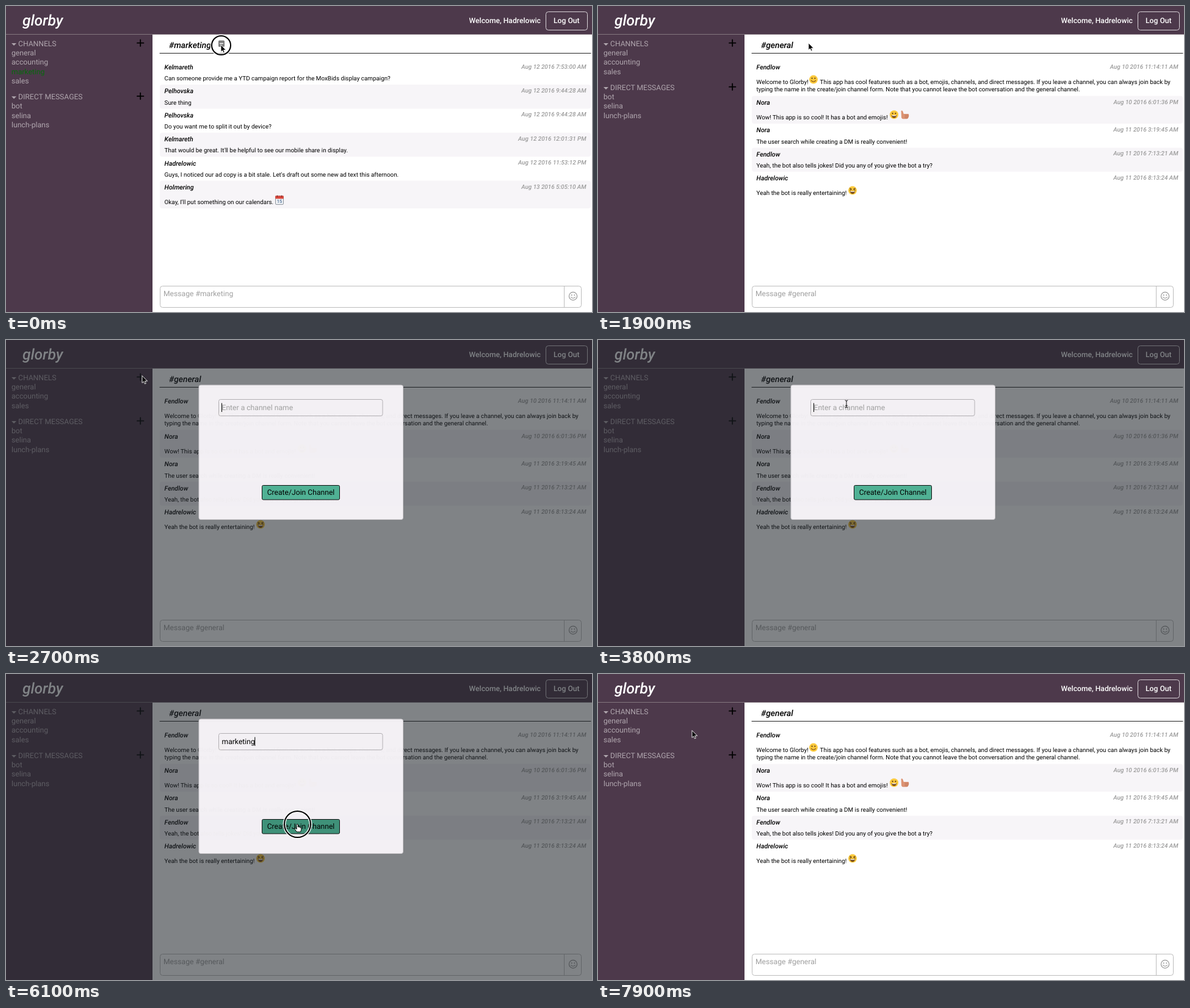
An HTML page for the animation above (8 s loop, 960 by 502 pixels).

```html
<!DOCTYPE html>
<html lang="en">
<head>
<meta charset="utf-8">
<title>Chat channels</title>
<style>
  html, body { margin: 0; width: 100%; height: 100%; overflow: hidden; background: #fff; }
  svg { display: block; width: 960px; height: 502px; }
  text { font-family: Roboto, Arial, sans-serif; font-size: 12.15px; text-rendering: geometricPrecision; white-space: pre; }
  .logo { font-size: 24.5px; font-style: italic; font-weight: 500; fill: #fff; }
  .nav { fill: #b0a6ae; }
  .active { fill: #066a0c; }
  .bold { font-weight: 500; }
  .title { font-size: 13.8px; font-style: italic; font-weight: 500; }
  .name { font-size: 10.6px; font-style: italic; font-weight: 500; }
  .date { font-size: 9.85px; font-style: italic; font-weight: 500; fill: #9b9b9b; text-anchor: end; }
  .msg { font-size: 9.85px; }
  .hint { fill: #a0a0a0; }
  .tip { font-size: 9.1px; font-weight: 500; fill: #ddd; text-anchor: middle; }
</style>
</head>
<body>
<svg id="stage" viewBox="0 0 960 502"></svg>
<script>
const LOOP = 8000, STEP = 100;

const text = (x, y, cls, s, extra = '') => `<text x="${x}" y="${y}" class="${cls}" ${extra}>${s}</text>`;
const rect = (x, y, w, h, fill, r = 0, stroke = 'none') =>
  `<rect x="${x}" y="${y}" width="${w}" height="${h}" rx="${r}" fill="${fill}" stroke="${stroke}"/>`;
const path = (d, fill, stroke = 'none', w = 1) =>
  `<path d="${d}" fill="${fill}" stroke="${stroke}" stroke-width="${w}" stroke-linejoin="round" stroke-linecap="round"/>`;
const group = (id, body) => `<g id="${id}">${body}</g>`;
const at = (x, y, body) => `<g transform="translate(${x} ${y})">${body}</g>`;

// Emojis, centred on the origin
const eyes = '<circle cx="-2.4" cy="-2" r="1.1" fill="#5b3a12"/><circle cx="2.4" cy="-2" r="1.1" fill="#5b3a12"/>';
const face = body => `<circle r="7" fill="#fbc93d"/>${body}`;
const emoji = {
  smile: face(eyes + path('M-3.6 1.8Q0 5.4 3.6 1.8', 'none', '#7a4a14', 1.1)),
  grin: face(eyes + path('M-4.3 .8H4.3Q3.6 5.4 0 5.4T-4.3 .8', '#6b3d10') + rect(-3.4, 1, 6.8, 1.4, '#fff')),
  laugh: face(path('M-4.4 -3.6L-1.6 -2L-4.4 -.6M4.4 -3.6L1.6 -2L4.4 -.6', 'none', '#5b3a12', 1.1) +
    path('M-4.3 1H4.3Q3.6 5.4 0 5.4T-4.3 1', '#6b3d10') + rect(-3.4, 1.2, 6.8, 1.3, '#fff')),
  thumb: path('M-6.4 -6.5Q-4.2 -7.6 -3.4 -5L-2.2 -1.4H5Q6.8 -1.2 6 .6Q6.8 2 5.8 3Q6.2 4.6 5 5.2Q4.8 6.8 3 6.8H-3.6Q-6.4 6 -6 2.6Z', '#dc9373') +
    path('M0 .9H5.6M0 3H5.4M0 5.1H4.6', 'none', '#b76f52', .7),
  calendar: rect(-6.5, -7, 13, 14, '#f1f3f6', 1.5, '#8d949c') + rect(-6.8, -7.3, 13.6, 5, '#d8473c', 1.2) +
    path('M-3.5 -7.6V-5.6M3.5 -7.6V-5.6', 'none', '#6d3230', 1) +
    text(0, 4.8, 'bold', '15', 'style="font-size:7.5px;text-anchor:middle" fill="#4c6f96"')
};

// One message: sender, date, lines as [x, offset, words], emojis as [kind, x, offset]
const plain = s => [[259.6, 32.6, s]];
const tall = s => [[259.6, 38.4, s]];
const marketing = [
  [39.4, 'Kelmareth', 'Aug 12 2016 7:53:00 AM', plain('Can someone provide me a YTD campaign report for the MoxBids display campaign?')],
  [39.4, 'Pelhovska', 'Aug 12 2016 9:44:28 AM', plain('Sure thing')],
  [39.4, 'Pelhovska', 'Aug 12 2016 9:44:28 AM', plain('Do you want me to split it out by device?')],
  [39.4, 'Kelmareth', 'Aug 12 2016 12:01:31 PM', plain("That would be great. It'll be helpful to see our mobile share in display.")],
  [39.4, 'Hadrelowic', 'Aug 12 2016 11:53:12 PM', plain("Guys, I noticed our ad copy is a bit stale. Let's draft out some new ad text this afternoon.")],
  [45.4, 'Holmering', 'Aug 13 2016 5:05:10 AM', tall("Okay, I'll put something on our calendars."), [['calendar', 448, 32]]]
];
const general = [
  [58, 'Fendlow', 'Aug 10 2016 11:14:11 AM', [
    [259.6, 38.4, 'Welcome to Glorby!'],
    [363.6, 38.4, 'This app has cool features such as a bot, emojis, channels, and direct messages. If you leave a channel, you can always join back by'],
    [259.6, 50.4, 'typing the name in the create/join channel form. Note that you cannot leave the bot conversation and the general channel.']
  ], [['smile', 353, 31]]],
  [45.4, 'Nora', 'Aug 10 2016 6:01:36 PM', tall('Wow! This app is so cool! It has a bot and emojis!'), [['grin', 485, 30.6], ['thumb', 503, 30.8]]],
  [39.4, 'Nora', 'Aug 11 2016 3:19:45 AM', plain('The user search while creating a DM is really convenient!')],
  [39.4, 'Fendlow', 'Aug 11 2016 7:13:21 AM', plain('Yeah, the bot also tells jokes! Did you any of you give the bot a try?')],
  [45.4, 'Hadrelowic', 'Aug 11 2016 8:13:24 AM', tall('Yeah the bot is really entertaining!'), [['laugh', 417, 30.8]]]
];

function room(name, messages) {
  let y = 89.6;
  let out = text(267, 69, 'title', '#' + name) + text(258, 476.3, 'hint', 'Message #' + name);
  messages.forEach(([h, who, when, lines, pics = []], i) => {
    if (i % 2) out += rect(252, y, 706, h, '#f7f5f8', 4);
    out += text(259.6, y + 14.3, 'name', who) + text(950.5, y + 12.9, 'date', when);
    for (const [x, dy, s] of lines) out += text(x, y + dy, 'msg', s);
    for (const [kind, x, dy] of pics) out += at(x, y + dy, emoji[kind]);
    y += h;
  });
  return out;
}

const section = (y, label, items) =>
  path(`M9 ${y - 5}h8l-4 4z`, '#b0a6ae') + text(20, y, 'nav', label) +
  path(`M215 ${y - 5.3}h10.4m-5.2 -5.2v10.4`, 'none', '#000', 1.8) +
  items.map((s, i) => text(9, y + 15.2 * (i + 1), s === 'marketing' ? 'active' : 'nav', s)).join('');
const sidebar = channels =>
  section(66, 'CHANNELS', channels) +
  section(92.4 + 15.2 * channels.length, 'DIRECT MESSAGES', ['bot', 'selina', 'lunch-plans']);

const ring = (color, w) => `<circle r="20" fill="none" stroke="${color}" stroke-width="${w}"/>`;

document.getElementById('stage').innerHTML =
  rect(0, 0, 960, 502, '#fff') +
  rect(0, 0, 960, 47, '#4d394b') + rect(0, 46, 240, 456, '#4d394b') +
  path('M0 46.5H960', 'none', '#83767f') +
  text(27, 32, 'logo', 'glorby') +
  text(876, 28.2, 'bold', 'Welcome, Hadrelowic', 'fill="#fff" text-anchor="end"') +
  rect(884.5, 9.5, 68, 30, 'none', 4, '#d8d2d7') + text(897, 28.2, 'bold', 'Log Out', 'fill="#fff"') +
  group('navFull', sidebar(['general', 'accounting', 'marketing', 'sales'])) +
  group('navShort', sidebar(['general', 'accounting', 'sales'])) +
  path('M252 77.5H958', 'none', '#222') +
  rect(252.5, 459.5, 690, 35, 'none', 4, '#bdbdbd') + path('M914.5 460V494', 'none', '#bdbdbd') +
  at(929, 476, `<circle r="6.6" fill="none" stroke="#999" stroke-width="1.2"/>
    <circle cx="-2.3" cy="-1.8" r="1" fill="#999"/><circle cx="2.3" cy="-1.8" r="1" fill="#999"/>` +
    path('M-3.4 1.6Q0 5 3.4 1.6', 'none', '#999', 1.1)) +
  group('roomMarketing', room('marketing', marketing) +
    '<rect id="leave" x="348" y="56.5" width="10" height="10.5" rx="1.5"/>' + path('M350.5 61.5h5', 'none', '#fff', 1.4)) +
  group('roomGeneral', room('general', general)) +
  group('tooltip', rect(307, 32, 91, 18.5, '#0a0a0a', 4) + path('M348.5 50h8.5l-4.2 4z', '#0a0a0a') +
    text(352.5, 44.4, 'tip', 'Leave Channel')) +
  group('modal', rect(0, 0, 960, 502, 'rgba(30,34,40,.56)') +
    '<rect x="316" y="74" width="334.5" height="220.5" rx="3" fill="#f7f4f8" fill-opacity=".965" stroke="#c9c6ca"/>' +
    rect(348.5, 97.5, 268.5, 27, 'none', 3, '#b3b0b4') +
    text(353.5, 114.8, 'hint', 'Enter a channel name', 'id="hint"') +
    text(353.5, 114.8, '', '', 'id="typed"') +
    '<rect id="caret" y="103.5" width="1" height="14.5"/>' +
    '<rect id="join" x="419.5" y="238.5" width="127" height="23.5" rx="2" stroke="#111"/>' +
    text(483, 254.2, '', 'Create/Join Channel', 'text-anchor="middle"')) +
  group('ring', ring('rgba(255,255,255,.85)', 5) + ring('#000', 2)) +
  group('cursor',
    group('arrow', path('M0 0V11.4L2.6 9L4.4 13L6.3 12.2L4.6 8.3H8.2Z', '#000', '#fff', .9)) +
    group('hand', path('M-1 1Q.2 -.6 1.3 1V5Q2.4 4.2 3.3 5.3Q4.4 4.7 5.2 5.9Q6.6 5.6 6.7 7.2V9.4L5.6 13H-.6L-3.8 8.6Q-4.3 6.8 -2.4 7.2L-1 8.4Z', '#fff', '#000', 1)) +
    group('beam', path('M-2 -6Q0 -6 0 -4.5Q0 -6 2 -6M0 -4.5V4.5M-1.4 2.4H1.4M-2 6Q0 6 0 4.5Q0 6 2 6', 'none', '#111', 1)));

const $ = id => document.getElementById(id);
const show = (id, on) => $(id).setAttribute('visibility', on ? 'inherit' : 'hidden');

// Pointer stops: time, x, y
const stops = [
  [0, 352, 64], [200, 352, 64], [400, 352, 61], [1800, 352, 61], [2500, 223, 59], [2900, 223, 59],
  [3700, 407, 105], [5100, 407, 105], [5700, 477, 246], [6700, 477, 246], [7700, 154, 93], [LOOP, 154, 93]
];
// Clicks: start, end
const clicks = [[-50, 100], [6000, 6200]];
const WORD = 'marketing', TYPE_FROM = 4000, TYPE_GAP = 100;
const TYPE_END = TYPE_FROM + WORD.length * TYPE_GAP;
const OPEN = 2700, CLOSE = 6200;

function pointer(t) {
  const i = stops.findIndex(s => s[0] > t);
  const [t0, x0, y0] = stops[i - 1], [t1, x1, y1] = stops[i];
  const p = (t - t0) / (t1 - t0), e = p * p * (3 - 2 * p);
  return [x0 + (x1 - x0) * e, y0 + (y1 - y0) * e];
}

function draw(t) {
  const [x, y] = pointer(t);
  const open = t >= OPEN && t < CLOSE;
  const inMarketing = t < 1700;
  const hovering = inMarketing && t >= 200;
  const onInput = open && x > 348 && x < 617 && y > 97 && y < 125;
  const onJoin = open && x > 419 && x < 547 && y > 238;

  show('navFull', t < 700);
  show('navShort', t >= 700);
  show('roomMarketing', inMarketing);
  show('roomGeneral', !inMarketing);
  show('tooltip', hovering);
  $('leave').setAttribute('fill', hovering ? '#111' : '#7c7c7c');

  show('modal', open);
  const count = Math.max(0, Math.min(WORD.length, Math.floor((t - TYPE_FROM) / TYPE_GAP) + 1));
  $('typed').textContent = WORD.slice(0, count);
  show('hint', count === 0);
  const typing = t >= TYPE_FROM && t < TYPE_END;
  const idle = t - (t < TYPE_FROM ? OPEN : TYPE_END);
  show('caret', open && (typing || idle % 1000 < 500));
  $('caret').setAttribute('x', 353 + (count ? $('typed').getComputedTextLength() : 0));
  $('join').setAttribute('fill', onJoin ? '#3f9179' : '#50b194');

  const click = clicks.find(([a, b]) => t >= a && t < b);
  show('ring', click);
  if (click) {
    const grow = Math.min(1, (t - click[0]) / 100);
    const r = click[0] < 0 ? 16 : 16 + 6 * grow;
    for (const c of $('ring').children) c.setAttribute('r', r - 0.5);
    $('ring').setAttribute('transform', `translate(${x + 0.5} ${y + 0.5})`);
  }

  $('cursor').setAttribute('transform', `translate(${x} ${y})`);
  show('cursor', !typing);
  const hand = hovering && t < 1800 || onJoin;
  show('hand', hand);
  show('beam', onInput);
  show('arrow', !hand && !onInput);
}

const start = performance.now();
function tick(now) {
  const t = Math.max(0, now - start) % LOOP;
  draw(Math.floor(t / STEP) * STEP);
  requestAnimationFrame(tick);
}
draw(0);
requestAnimationFrame(tick);
</script>
</body>
</html>
```
